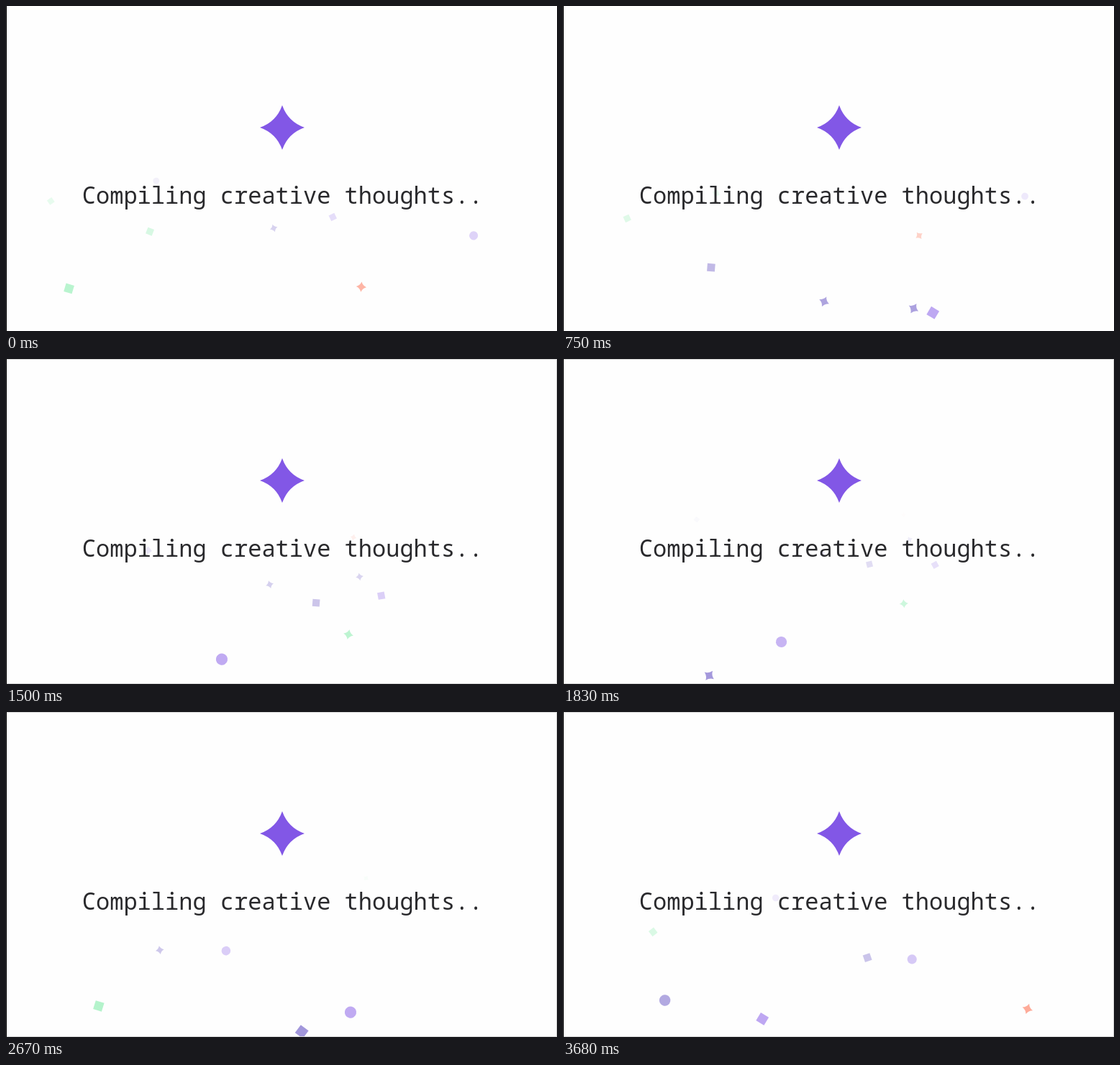
Write an HTML page with a canvas that moves like this. It is 766 by 452 pixels and loops after 3.74 s.

```html
<!DOCTYPE html>
<html lang="en">
<head>
<meta charset="utf-8">
<title>Compiling creative thoughts</title>
<style>
  html, body { margin: 0; width: 100%; height: 100%; overflow: hidden; background: #fefefe; }
  canvas { display: block; }
</style>
</head>
<body>
<canvas id="stage" width="766" height="452"></canvas>
<script>
const W = 766, H = 452, LOOP = 3740;
const FLOOR = 460, CEILING = 212, SPIN = -55;
const ctx = document.getElementById('stage').getContext('2d');

const violet = { fill: '#8257e6', sway: 80 };
const indigo = { fill: '#5a45bf', sway: 80 };
const orange = { fill: '#fe5530', sway: 80 };
const green = { fill: '#62e893', sway: -120 };

const square = {
  size: 14, rise: 130,
  trace: r => ctx.rect(-r, -r, 2 * r, 2 * r)
};
const circle = {
  size: 18, rise: 73,
  trace: r => ctx.arc(0, 0, r, 0, Math.PI * 2)
};
const star = {
  size: 17, rise: 130,
  trace(r) {
    const c = r * 0.26;
    ctx.moveTo(0, -r);
    ctx.quadraticCurveTo(c, -c, r, 0);
    ctx.quadraticCurveTo(c, c, 0, r);
    ctx.quadraticCurveTo(-c, c, -r, 0);
    ctx.quadraticCurveTo(-c, -c, 0, -r);
  }
};

// shape, colour, launch (s), x, own rise (px/s) if unlike its shape
const confetti = [
  [circle, indigo, -2.97, 207],
  [square, green, -2.06, 222, 71],
  [circle, violet, -1.925, 635],
  [square, green, -1.45, 75],
  [square, violet, -1.28, 442],
  [star, indigo, -1.16, 358],
  [star, orange, -0.73, 480, 95],
  [square, green, -0.515, 108],
  [square, indigo, 0.01, 190],
  [star, indigo, 0.375, 352],
  [square, violet, 0.495, 506],
  [star, indigo, 0.5, 478, 157],
  [square, indigo, 0.76, 415, 163],
  [star, green, 0.91, 498],
  [circle, violet, 0.92, 290],
  [star, indigo, 1.68, 198],
  [circle, violet, 2.09, 469],
  [square, green, 2.17, 146, 102],
  [square, indigo, 2.52, 407, 102],
  [circle, indigo, 3.144, 129, 110],
  [star, orange, 3.185, 635, 95],
  [square, violet, 3.426, 269]
];

function place(shape, fill, size, x, y, angle, alpha = 1) {
  ctx.save();
  ctx.translate(x, y);
  ctx.rotate(angle * Math.PI / 180);
  ctx.globalAlpha = alpha;
  ctx.fillStyle = fill;
  ctx.beginPath();
  shape.trace(size / 2);
  ctx.fill();
  ctx.restore();
}

// each piece rises steadily on a bowed path, shrinking and fading out
function drawPiece(t, [shape, color, launch, x, rise = shape.rise]) {
  const age = t / 1000 - launch;
  const y = FLOOR - rise * age;
  const u = (FLOOR - y) / (FLOOR - CEILING);
  if (u < 0 || u > 1) return;
  const bow = color.sway * u * (0.9 - u);
  place(shape, color.fill, shape.size * (1 - 0.58 * u), x + bow, y, 45 + SPIN * age, 0.6 * (1 - u));
}

// a quarter turn, then a rest
function logoAngle(t) {
  const p = Math.min(1, t % 920 / 410);
  return 45 * (1 - Math.cos(Math.PI * p));
}

function drawEdges(t) {
  if (t >= 900) {
    ctx.strokeStyle = '#d4d4d4';
    ctx.strokeRect(0.5, 0.5, W - 1, H - 1);
  }
  ctx.fillStyle = '#000';
  ctx.fillRect(0, 0, 1, H);
}

function draw(t) {
  ctx.fillStyle = '#fefefe';
  ctx.fillRect(0, 0, W, H);
  confetti.forEach(piece => drawPiece(t, piece));
  place(star, violet.fill, 62, 384, 169, logoAngle(t));
  ctx.fillStyle = '#29292c';
  ctx.font = '350 32px "Roboto Mono", "Noto Sans Mono", monospace';
  ctx.fillText('Compiling creative thoughts..', 105.8, 275);
  drawEdges(t);
}

const start = performance.now();
function tick() {
  draw((performance.now() - start) % LOOP);
  requestAnimationFrame(tick);
}
tick();
</script>
</body>
</html>
```
